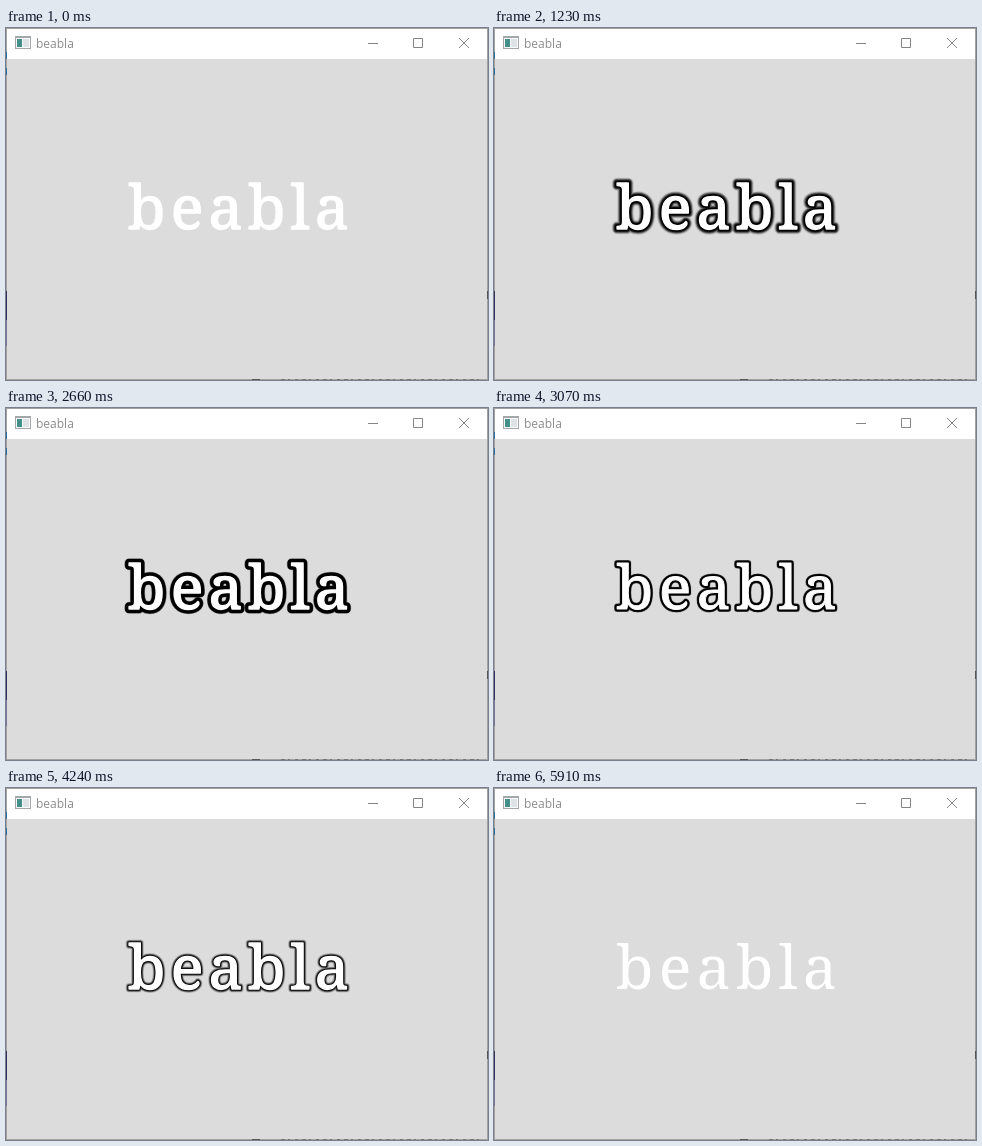
An HTML page with a canvas for the animation above (6090 ms loop, 482x352 px).

```html
<!DOCTYPE html>
<html>
<head>
<meta charset="utf-8">
<style>
html, body { margin: 0; width: 100%; height: 100%; overflow: hidden; background: #dcdcdc; }
canvas { display: block; }
</style>
</head>
<body>
<canvas width="482" height="352"></canvas>
<script>
const ctx = document.querySelector('canvas').getContext('2d');
const LOOP = 6090, NAME = 'beabla', BOLD = 0.7, STEP = 0.4;

const clamp = x => Math.min(1, Math.max(0, x));
const ramp = (t, from, to) => clamp((t - from) / (to - from));

function smooth(from, to, x) {
  const u = ramp(x, from, to);
  return u * u * (3 - 2 * u);
}

// each setting is dragged in turn: outline radius, its softness, fill weight
function pose(t) {
  const grow = ramp(t, 670, 1230), swell = ramp(t, 1310, 1640);
  const sharpen = ramp(t, 2150, 2710);
  const thin = ramp(t, 2760, 3350), regain = ramp(t, 3400, 3960);
  const blur = ramp(t, 4040, 4600);
  const fade = ramp(t, 5170, 5760), slim = ramp(t, 5810, 5910);
  return {
    radius: -2.2 + 5.4 * grow + 0.6 * swell - 3 * thin + 1.2 * regain - 0.4 * blur - 5 * fade,
    soft: 2.2 - 1.7 * sharpen + 2.9 * blur,
    weight: BOLD - 0.5 * thin + 0.5 * regain - BOLD * slim
  };
}

function rect(color, x, y, w, h) {
  ctx.fillStyle = color;
  ctx.fillRect(x, y, w, h);
}

function line(x1, y1, x2, y2) {
  ctx.beginPath();
  ctx.moveTo(x1, y1);
  ctx.lineTo(x2, y2);
  ctx.stroke();
}

function drawWindow() {
  rect('#a2a2a2', 0, 0, 482, 352);
  rect('#fff', 1, 1, 480, 30);
  rect('#dcdcdc', 1, 31, 480, 320);

  // desktop showing at the edges
  rect('#2f6f9f', 0, 24, 1, 7);
  rect('#2f6f9f', 0, 40, 1, 7);
  rect('#30355f', 0, 263, 1, 29);
  rect('#77779a', 0, 292, 1, 26);
  rect('#555', 481, 263, 1, 8);
  rect('#555', 246, 351, 8, 1);
  for (let x = 275; x < 476; x += 7) rect('#777', x, 351, 2 + x % 3, 1);

  // title icon
  rect('#a4a8ab', 9, 8, 16, 13);
  rect('#fafafa', 10, 10, 14, 10);
  rect('#438f8a', 11, 11, 5, 8);
  rect('#dfe3e5', 17, 11, 6, 8);

  ctx.font = '12px "Open Sans", "Noto Sans", sans-serif';
  ctx.letterSpacing = '0px';
  ctx.fillStyle = '#8c8c8c';
  ctx.fillText(NAME, 30, 20);

  ctx.strokeStyle = '#858585';
  ctx.lineWidth = 1;
  line(362, 15.5, 372, 15.5);
  ctx.strokeRect(407.5, 10.5, 9, 9);
  line(453, 10, 463, 20);
  line(463, 10, 453, 20);
}

function strokeWord(radius) {
  ctx.lineWidth = 2 * radius;
  ctx.strokeText(NAME, 122, 201);
}

function drawWord({ radius, soft, weight }) {
  ctx.font = '61px "Noto Serif", serif';
  ctx.letterSpacing = '5.2px';
  ctx.lineJoin = 'round';

  // nested strokes add up to a soft-edged outline
  let cover = 0;
  ctx.strokeStyle = '#000';
  for (let i = Math.ceil((radius + soft) / STEP); i >= 0 && cover < 1; i--) {
    const r = i * STEP;
    const next = 1 - smooth(radius - soft, radius + soft, r);
    if (next <= cover) continue;
    ctx.globalAlpha = (next - cover) / (1 - cover);
    strokeWord(BOLD + r);
    cover = next;
  }

  ctx.globalAlpha = 1;
  ctx.fillStyle = ctx.strokeStyle = '#fff';
  ctx.fillText(NAME, 122, 201);
  if (weight > 0) strokeWord(weight);
}

function frame() {
  drawWindow();
  drawWord(pose(performance.now() % LOOP));
  requestAnimationFrame(frame);
}
frame();
</script>
</body>
</html>
```
